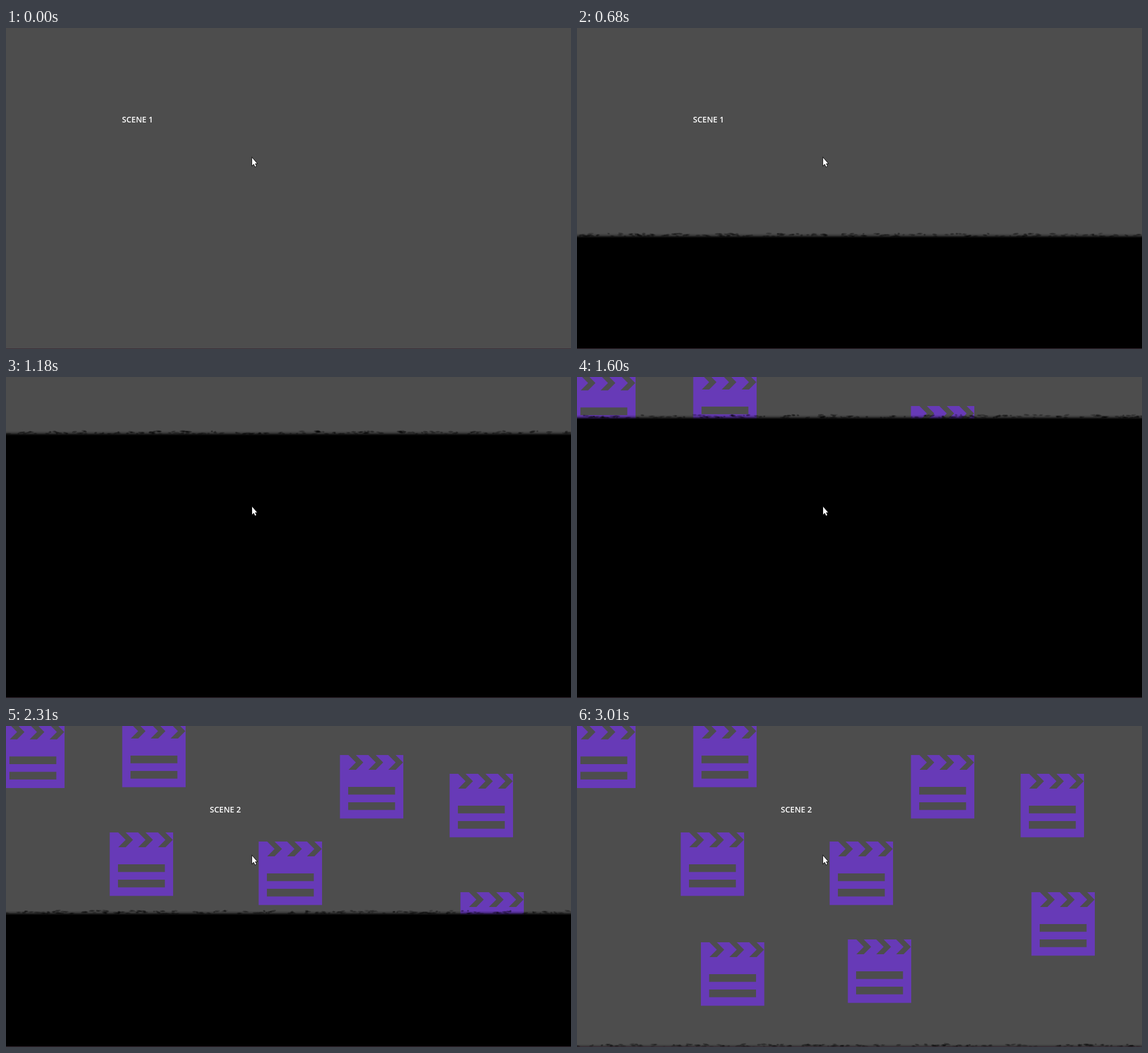
Write an HTML page with a canvas that moves like this. It is 994x564 px and loops after 3340 ms.

```html
<!DOCTYPE html>
<html lang="en">
<head>
<meta charset="utf-8">
<title>Scene wipe</title>
<style>
  html, body { margin: 0; width: 100%; height: 100%; overflow: hidden; background: #4d4d4d; }
  svg, canvas { position: absolute; left: 0; top: 0; width: 994px; height: 564px; display: block; }
  text { font: 600 14px "Open Sans", "Noto Sans", sans-serif; fill: #fff; }
</style>
</head>
<body>
<svg viewBox="0 0 994 564">
  <defs>
    <path id="clap" fill="#673ab7" fill-rule="evenodd" d="M0 0H15L28 13L15 26H28L41 13L28 0H50L63 13L50 26H63L76 13L63 0H85L98 13L85 26H98L111 13L98 0H111.5V111.5H0Z
      M14.5 56H97V69.5H14.5Z M14.5 83H97V96.5H14.5Z"/>
  </defs>
  <rect width="994" height="564" fill="#4d4d4d"/>
  <g id="scene1"><text x="204" y="166">SCENE 1</text></g>
  <g id="scene2"><text x="358.5" y="152">SCENE 2</text></g>
</svg>
<canvas id="wipe" width="994" height="564"></canvas>
<svg viewBox="0 0 994 564">
  <rect y="563" width="994" height="1" fill="#3b2c37"/>
  <path d="M433 228V241.6L436 238.8L438.2 243.6L440.2 242.7L438 238H441.6Z" fill="#fff" stroke="#111" stroke-width="1.6" paint-order="stroke"/>
</svg>
<script>
const W = 994, H = 564, LOOP = 3340, SWAP = 15;
const $ = id => document.getElementById(id);
const scene1 = $("scene1"), scene2 = $("scene2");
const ctx = $("wipe").getContext("2d");

const icons = [[-8.5, -2.5], [204.5, -4], [587.5, 51], [780.5, 84], [182.5, 187],
  [444.5, 203], [799.5, 292], [218, 380], [476.5, 375]];
for (const [x, y] of icons) {
  const use = document.createElementNS("http://www.w3.org/2000/svg", "use");
  use.setAttribute("href", "#clap");
  use.setAttribute("x", x);
  use.setAttribute("y", y);
  scene2.append(use);
}

// Start time of each wipe step: 70 ms apart, a few 80 ms
const starts = [380];
for (let i = 0; i < 37; i++) starts.push(starts[i] + ([0, 2, 4, 23].includes(i) ? 80 : 70));

// Top of the solid black area
const edgeAt = step => step < SWAP ? 521 - 38 * step : Math.min(567, 23 + 25.8 * (step - SWAP));

function randomFrom(seed) {
  let s = seed * 7919 + 17;
  return () => (s = (s * 16807) % 2147483647) / 2147483647;
}

function drawWipe(step) {
  ctx.clearRect(0, 0, W, H);
  if (step < 0) return;
  const edge = edgeAt(step);
  const fade = ctx.createLinearGradient(0, edge - 8, 0, edge);
  fade.addColorStop(0, "rgba(0,0,0,0)");
  fade.addColorStop(0.4, "rgba(0,0,0,.22)");
  fade.addColorStop(0.75, "rgba(0,0,0,.75)");
  fade.addColorStop(1, "#000");
  ctx.fillStyle = fade;
  ctx.fillRect(0, edge - 8, W, H + 16);

  // Ragged smudges along the edge
  const rnd = randomFrom(step + 1);
  for (let i = 0; i < 170; i++) {
    const x = rnd() * W, up = 3 + 5 * rnd() ** 1.3, r = 2 + 4 * rnd();
    for (const k of [1, 0.6]) {
      ctx.fillStyle = `rgba(0,0,0,${0.12 + 0.18 * rnd()})`;
      ctx.beginPath();
      ctx.ellipse(x, edge - up, r * k, 1.7 * k, (rnd() - 0.5) * 0.5, 0, 7);
      ctx.fill();
    }
  }
}

let shown = null;
function render(now) {
  const t = now % LOOP;
  const step = starts.filter(s => s <= t).length - 1;
  if (step !== shown) {
    shown = step;
    scene1.style.display = step < SWAP ? "" : "none";
    scene2.style.display = step < SWAP ? "none" : "";
    drawWipe(step);
  }
}

const begin = performance.now();
function tick() {
  render(performance.now() - begin);
  requestAnimationFrame(tick);
}
tick();
</script>
</body>
</html>
```
